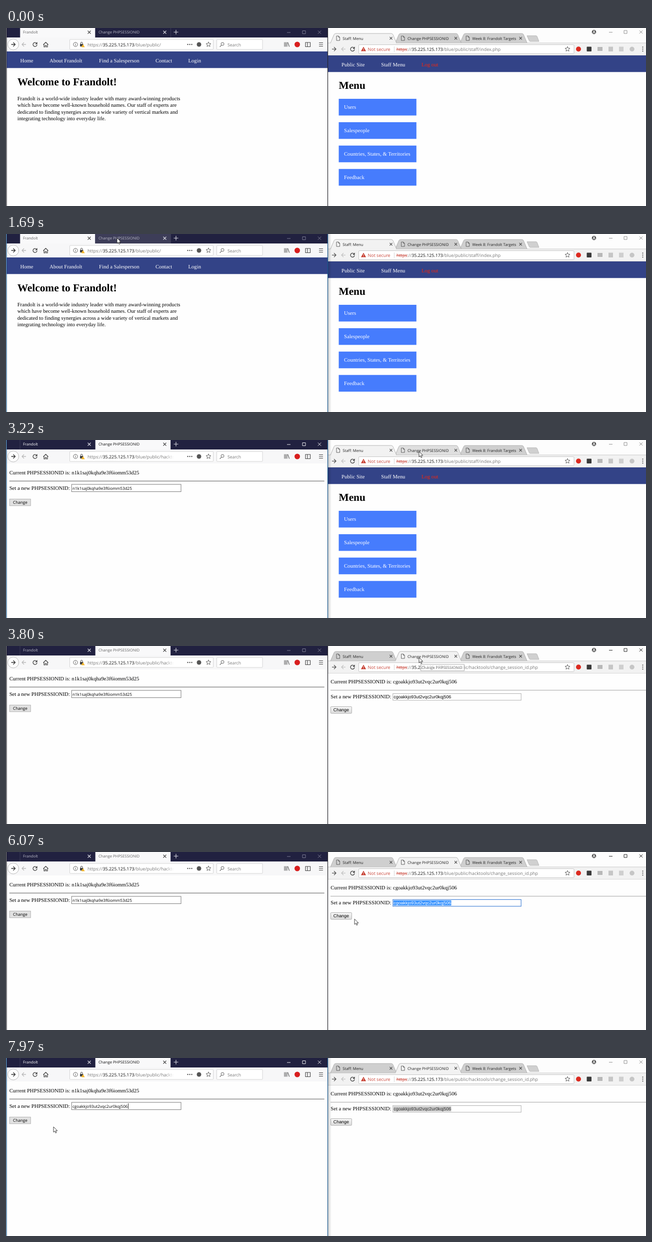
An HTML page for the animation above (8 s loop, 1280 by 357 pixels).

```html
<!DOCTYPE html>
<html lang="en">
<head>
<meta charset="utf-8">
<title>Two browsers</title>
<style>
html, body { margin: 0; width: 100%; height: 100%; overflow: hidden; background: #fefefe; }
svg { display: block; width: 100%; height: 100%; }
text { text-rendering: geometricPrecision; white-space: pre; }
.ui { font-family: "Open Sans", "Noto Sans", sans-serif; }
.page { font-family: "Liberation Serif", serif; font-size: 10.67px; }
.head { font-family: "Liberation Serif", serif; font-size: 21.33px; font-weight: bold; }
.arial { font-family: "Liberation Sans", sans-serif; font-size: 8.89px; }
</style>
</head>
<body>
<svg id="stage" viewBox="0 0 1280 357" xmlns="http://www.w3.org/2000/svg"></svg>
<script>
const LOOP = 8000;
const BRAND = 'Frandolt';
const TITLE = 'Change PHPSESSIONID';
const LEFT_ID = 'n1k1saj0kqha9e3f6iomm53d25';
const RIGHT_ID = 'cgoakkjo93ut2vqc2ur0kqj506';
const HOST = '35.225.125.173';
const NAVY = '#334387';

// Markup helpers
const rect = (x, y, w, h, fill, more = '') =>
  `<rect x="${x}" y="${y}" width="${w}" height="${h}" fill="${fill}" ${more}/>`;
const circle = (x, y, r, fill, more = '') =>
  `<circle cx="${x}" cy="${y}" r="${r}" fill="${fill}" ${more}/>`;
const line = (d, color, w = 1, more = '') =>
  `<path d="${d}" fill="none" stroke="${color}" stroke-width="${w}" ${more}/>`;
const text = (x, y, str, cls, fill = '#000', more = '') =>
  `<text x="${x}" y="${y}" class="${cls}" fill="${fill}" ${more}>${str}</text>`;
const ui = (x, y, size, str, fill, more = '') =>
  text(x, y, str, 'ui', fill, `font-size="${size}" ${more}`);
const group = (id, body, more = '') => `<g id="${id}" ${more}>${body}</g>`;
const cross = (x, y, r, color, w = 1, more = '') =>
  line(`M${x - r} ${y - r}l${2 * r} ${2 * r}m0 ${-2 * r}l${-2 * r} ${2 * r}`, color, w, more);
const arrow = (x, y, dir, color) =>
  line(`M${x - 4 * dir} ${y}h${8 * dir}M${x} ${y - 4}l${-4 * dir} 4l${4 * dir} 4`, color, 1.3);
const reload = (x, y) =>
  line(`M${x + 3} ${y - 2.6}a4 4 0 1 0 1 3.2`, '#444', 1.3) +
  `<path d="M${x + 4.6} ${y - 5}v4.4h-4.4z" fill="#444"/>`;
const star = (x, y) => {
  let d = '';
  for (let i = 0; i < 10; i++) {
    const a = Math.PI * (i / 5 - 0.5), r = i % 2 ? 2.3 : 5.2;
    d += (i ? 'L' : 'M') + (x + r * Math.cos(a)).toFixed(2) + ' ' + (y + r * Math.sin(a)).toFixed(2);
  }
  return line(d + 'z', '#555', 0.9);
};
const controls = (id, xs, y) => group(id,
  line(`M${xs[0] - 3} ${y + 0.5}h7M${xs[1] - 3} ${y - 3}h6v6h-6z`, 'currentColor', 0.9) +
  cross(xs[2], y, 3.2, 'currentColor', 0.9));
const navBar = (x, y, w, items) => rect(x, y, w, 33.3, NAVY) +
  items.map(([tx, str, color = '#fff']) => text(tx, y + 21.8, str, 'page', color)).join('');

function leftChrome() {
  return rect(1, 0, 642, 19, '#212140') +
    rect(28, 0, 150.5, 19, '#f9f9fa', 'id="lTab"') +
    rect(178.5, 0, 150.5, 19, '#3d3d58', 'id="lHover"') +
    line('M28 0v19M178.5 0v19M329.5 0v19', '#4a4a66', 0.6) +
    ui(34, 11.3, 7.65, BRAND, '', 'id="lName0"') +
    ui(185, 11.3, 7.65, TITLE, '', 'id="lName1"') +
    cross(166.5, 8.5, 3, 'currentColor', 1.1, 'id="lClose0"') +
    cross(317.5, 8.5, 3, 'currentColor', 1.1, 'id="lClose1"') +
    line('M335.5 8.3h9m-4.5 -4.5v9', '#dcdce4', 1.1) +
    controls('lControls', [565, 596, 627], 8.5) +
    rect(1, 19, 642, 28, '#f7f7f8') +
    circle(14.5, 33, 11, '#fdfdfd', 'stroke="#aaa" stroke-width=".8"') +
    arrow(14.5, 33, -1, '#333') + arrow(36, 33, 1, '#bbb') + reload(58, 33) +
    line('M74.5 33.5l5-4.8l5 4.8M76 33v5h2.4v-3h2.2v3H83v-5', '#444', 1.2) +
    rect(127.5, 23, 287, 20, '#fff', 'id="urlBox" rx="1" stroke-width=".8"') +
    circle(139, 33, 4.2, 'none', 'stroke="#555" stroke-width=".9"') +
    line('M139 32.3v3M139 30.3v1', '#555', 1) +
    rect(148, 32, 6.5, 5, '#444') + line('M149.4 32v-1.8a1.8 1.8 0 0 1 3.6 0v1.8', '#444', 1) +
    '<path d="M154 32.5l3.6 6h-7.2z" fill="#f3b52a"/>' +
    `<text x="163" y="36.6" class="ui" font-size="8.93" fill="#777" clip-path="url(#urlClip)">https://<tspan fill="#111">${HOST}</tspan>/blue/public/<tspan id="lPath">hacktools/</tspan></text>` +
    rect(318, 24, 18, 18, 'url(#fade)') +
    circle(363.5, 33, 1.2, '#555') + circle(367.5, 33, 1.2, '#555') + circle(371.5, 33, 1.2, '#555') +
    circle(386, 33, 4.5, '#555') + star(405, 33) +
    rect(421.5, 23, 91.5, 20, '#fff', 'rx="1" stroke="#ccc" stroke-width=".8"') +
    circle(433, 32, 3, 'none', 'stroke="#666"') + line('M431 34.4l-3.4 3.4', '#666', 1.2) +
    ui(443, 36.6, 8.55, 'Search', '#777') +
    line('M557 28.5v9M559.5 28.5v9M562 28.5v9M563.6 28.7l3 8.8', '#555', 1.1) +
    circle(582.5, 33, 5.5, '#d81e1e') +
    line('M599 29h9.5v8.5H599zM603 29v8.5', '#444', 1.1) +
    line('M626 29.5h8M626 33h8M626 36.5h8', '#444', 1.2);
}

function leftHome() {
  const story = [
    BRAND + ' is a world-wide industry leader with many award-winning products',
    'which have become well-known household names. Our staff of experts are',
    'dedicated to finding synergies across a wide variety of vertical markets and',
    'integrating technology into everyday life.'
  ];
  return navBar(1, 47, 642, [[28.5, 'Home'], [87, 'About ' + BRAND], [186, 'Find a Salesperson'],
      [299, 'Contact'], [364.5, 'Login']]) +
    text(22.7, 115, `Welcome to ${BRAND}!`, 'head') +
    story.map((s, i) => text(22.7, 145 + i * 13.4, s, 'page')).join('');
}

function leftForm() {
  return text(6.7, 68.5, 'Current PHPSESSIONID is: ' + LEFT_ID, 'page') +
    line('M6.7 82.3h630', '#555', 1) +
    text(6.7, 100, 'Set a new PHPSESSIONID:', 'page') +
    rect(131.2, 89, 218.8, 14.6, '#fff', 'id="lField" stroke-width="1"') +
    rect(133, 91, 119.5, 11, '#0078d7', 'id="lSelect"') +
    ui(133, 99.6, 8.12, LEFT_ID, '#000', 'id="lValue"') +
    rect(244.2, 91, 0.8, 11, '#000', 'id="lCaret"') +
    rect(7.2, 118.4, 42, 13.4, '#e1e1e1', 'stroke="#adadad" stroke-width=".9"') +
    ui(14, 128.2, 8.2, 'Change', '#000');
}

function rightTab(i, name) {
  const x = 649 + i * 129.6, w = i === 2 ? 134 : 132;
  return group('rTab' + i,
    `<path id="rShape${i}" d="M${x} 30l7-16.5q1-2.5 3.5-2.5h${w - 21}q2.5 0 3.5 2.5l7 16.5" stroke="#a5a5a5" stroke-width=".8"/>` +
    line(`M${x + 12} 16h4l2.5 2.5v6.5h-6.500zM${x + 16} 16v2.5h2.500`, '#555', 0.9) +
    ui(x + 24.3, 23.8, 7.7, name, '#222') +
    cross(x + 121, 20.5, 2.6, '#444', 1.1));
}

function rightChrome() {
  return rect(644, 0, 636, 30, '#fdfdfd') +
    '<path d="M1042 15.500h18q1.500 0 2.200 1.500l3.800 10h-17q-2 0-2.600-1.500z" fill="#d0d0d0" stroke="#aaa" stroke-width=".7"/>' +
    rightTab(2, `Week 8: ${BRAND} Targets`) + rightTab(1, TITLE) + rightTab(0, 'Staff: Menu') +
    circle(1176, 8, 4.3, '#555') + circle(1176, 6.7, 1.4, '#fff') +
    line('M1173.500 10.300q2.500-2.400 5 0', '#fff', 1.2) +
    controls('rControls', [1209, 1239, 1270], 8) +
    rect(644, 30, 636, 25, '#f2f2f2') + line('M644 54.6h636', '#ccc', 0.7) +
    line('M644 30h5.500M1040 30h240', '#b5b5b5', 0.7) +
    line('', '#b5b5b5', 0.7, 'id="rEdge"') +
    arrow(656, 42.3, -1, '#555') + arrow(675, 42.3, 1, '#c4c4c4') + reload(693, 42.3) +
    rect(705.5, 33.5, 430.5, 18, '#fff', 'rx="1.5" stroke="#bbb" stroke-width=".8"') +
    '<path d="M715 37.500l5 9h-10z" fill="#c53a2c"/>' + line('M715 40.500v3M715 44.400v1', '#fff', 1) +
    ui(723.5, 45.8, 8.95, 'Not secure', '#c9463a') +
    line('M776.500 37v11', '#ccc', 0.8) +
    `<text x="781" y="45.8" class="ui" font-size="8.85" fill="#777"><tspan fill="#c9463a">https</tspan>://<tspan fill="#111">${HOST}</tspan>/blue/public/<tspan id="rPath"></tspan></text>` +
    line('M780.500 43h22', '#c9463a', 0.9) + star(1123, 42.3) +
    circle(1145, 42.3, 5, '#dc2a20') + rect(1161.5, 37.5, 9.5, 9.5, '#3a3a3a', 'rx="1"') +
    rect(1183, 38, 10, 8, '#b8b8b8') + rect(1205, 37.5, 9, 9.5, '#c6c6c6') +
    rect(1226, 37.5, 9, 9.5, '#cfcfcf') + circle(1252, 42.3, 4.8, '#c6c6c6') +
    [38.3, 42.3, 46.3].map(y => circle(1273.5, y, 1.1, '#555')).join('');
}

function rightMenu() {
  const items = ['Users', 'Salespeople', 'Countries, States, &amp; Territories', 'Feedback'];
  return navBar(644, 55, 636, [[671, 'Public Site'], [750.3, 'Staff Menu'], [831, 'Log out', '#f5260c']]) +
    text(665.5, 122.3, 'Menu', 'head') +
    items.map((s, i) => rect(665.5, 142 + i * 46.9, 155.3, 33.5, '#467cfd') +
      text(676, 162.3 + i * 46.9, s, 'page', '#fff')).join('');
}

function rightForm() {
  return text(649.3, 75.3, 'Current PHPSESSIONID is: ' + RIGHT_ID, 'page') +
    line('M649 88.700h631', '#999', 0.9) +
    text(649.3, 105.2, 'Set a new PHPSESSIONID:', 'page') +
    rect(773.8, 95.4, 256.4, 13.4, '#fff', 'id="rField"') +
    rect(775, 97, 115.5, 10.2, '', 'id="rSelect"') +
    text(775.3, 105, RIGHT_ID, 'arial', '#000', 'id="rValue"') +
    rect(807, 97, 0.8, 10, '#000', 'id="rCaret"') +
    rect(649.4, 121.6, 42, 13.5, 'url(#btn)', 'rx="1.3" stroke="#a9a9a9" stroke-width=".9"') +
    text(654.8, 131.4, 'Change', 'arial');
}

const stage = document.getElementById('stage');
stage.innerHTML = `<defs>
  <clipPath id="urlClip"><rect x="160" y="24" width="175.5" height="18"/></clipPath>
  <linearGradient id="fade"><stop stop-color="#fff" stop-opacity="0"/><stop offset="1" stop-color="#fff"/></linearGradient>
  <linearGradient id="btn" x2="0" y2="1"><stop stop-color="#f8f8f8"/><stop offset="1" stop-color="#dcdcdc"/></linearGradient>
  <linearGradient id="shade"><stop stop-opacity=".18"/><stop offset="1" stop-opacity="0"/></linearGradient>
  </defs>` +
  rect(0, 0, 1280, 357, '#fefefe') +
  leftChrome() + group('lHome', leftHome()) + group('lForm', leftForm()) +
  rightChrome() + group('rMenu', rightMenu()) + group('rForm', rightForm()) +
  rect(644, 0, 7, 357, 'url(#shade)', 'id="lShade"') +
  line('M1 0v357M643.500 0v357', '', 1.2, 'id="lBorder"') +
  group('tip', rect(829.5, 37, 87, 12.7, '#fff', 'stroke="#777" stroke-width=".8"') +
    ui(831, 46, 7.6, TITLE, '#575757')) +
  group('cursor',
    '<path id="pointer" d="M0 0v10.800l2.500-2.300l1.700 3.900l1.800-.8l-1.700-3.700h3.500z" fill="#fff" stroke="#111" stroke-width=".8"/>' +
    line('M-2.500-5.500h2l.5.500l.5-.5h2M0-5V5M-2.500 5.500h2l.5-.5l.5.500h2', '#111', 0.9, 'id="beam"'));

const el = {};
stage.querySelectorAll('[id]').forEach(n => el[n.id] = n);
const show = (id, on) => { el[id].style.display = on ? '' : 'none'; };
const set = (id, name, value) => el[id].setAttribute(name, value);

// Pointer moves: start, end, from x, y, to x, y, bend x, y
const moves = [
  [235, 490, 1101, 330, 630, 241, 0, 0],
  [670, 1360, 630, 241, 222, 8, 0, 0],
  [2000, 2380, 222, 8, 220, 96, 0, 0],
  [2510, 3220, 220, 96, 826, 23, 0, 0],
  [3930, 4310, 826, 23, 717, 109, 0, 0],
  [4340, 4510, 717, 109, 793, 101, 0, 0],
  [4900, 5100, 793, 101, 807, 106, 0, 0],
  [5640, 6450, 807, 106, 592, 147, 8, 6],
  [6460, 6920, 592, 147, 218, 96, 0, 0],
  [7570, 7970, 218, 96, 95, 138, 0, 0]
];
const clamp = v => Math.max(0, Math.min(1, v));

function pointerAt(t) {
  const [a, b, x0, y0, x1, y1, bx, by] = moves.filter(m => t >= m[0]).pop() || moves[0];
  const p = clamp((t - a) / (b - a)), e = p * p * (3 - 2 * p), arc = 4 * e * (1 - e);
  return [x0 + (x1 - x0) * e + bx * arc, y0 + (y1 - y0) * e + by * arc];
}

function paint(t) {
  const [x, y] = pointerAt(t);
  const over = (x0, y0, x1, y1) => t >= 260 && x >= x0 && x <= x1 && y >= y0 && y <= y1;
  const between = (a, b) => t >= a && t < b;

  const lForm = t >= 1740, rForm = t >= 3580, rSecond = t >= 3530;
  const lActive = between(1740, 3530) || t >= 7100;
  const rActive = between(3530, 7100);
  const pasted = t >= 7560, lSelected = between(7330, 7560), rSelected = t >= 5250;

  // Left window
  set('lBorder', 'stroke', between(1690, 3530) || t >= 7100 ? '#17568c' : '#26262c');
  show('lShade', between(1690, 3530) || t >= 7100);
  set('lTab', 'x', lForm ? 178.5 : 28);
  show('lHover', !lForm && over(178, 0, 329, 19));
  [0, 1].forEach(i => {
    const chosen = lForm === (i === 1);
    const color = chosen ? (lActive ? '#111' : '#666') : (lActive ? '#fff' : '#b9b9c6');
    set('lName' + i, 'fill', color);
    set('lClose' + i, 'color', chosen ? '#444' : '#dcdce4');
  });
  set('lControls', 'color', lActive ? '#fff' : '#85859a');
  set('urlBox', 'stroke', over(127, 22, 415, 43) ? '#999' : '#ccc');
  show('lPath', lForm);
  show('lHome', !lForm);
  show('lForm', lForm);
  const inLeft = lForm && over(131, 89, 350, 104);
  set('lField', 'stroke', inLeft ? '#222' : '#7a7a7a');
  show('lSelect', lSelected);
  set('lValue', 'fill', lSelected ? '#fff' : '#000');
  el.lValue.textContent = pasted ? RIGHT_ID : LEFT_ID;
  show('lCaret', pasted);

  // Right window
  const tabFill = i => (rSecond ? 1 : 0) === i ? '#f2f2f2'
    : i === 1 && over(784, 11, 908, 30) ? '#dfdfdf' : '#cfcfcf';
  [0, 1, 2].forEach(i => set('rShape' + i, 'fill', tabFill(i)));
  const front = el[rSecond ? 'rTab1' : 'rTab0'];
  if (front.nextElementSibling !== el.rTab2.parentNode.querySelector('#rTab0, #rTab1') &&
      front.dataset.front !== '1') {
    const back = el[rSecond ? 'rTab0' : 'rTab1'];
    back.after(front);
    front.dataset.front = '1';
    back.dataset.front = '';
  }
  set('rEdge', 'd', rSecond ? 'M649 30h130M910 30h130' : 'M780 30h260');
  set('rControls', 'color', rActive ? '#111' : '#8a8a8a');
  el.rPath.textContent = rForm ? 'hacktools/change_session_id.php' : 'staff/index.php';
  show('rMenu', !rForm);
  show('rForm', rForm);
  const focus = between(4870, 7100);
  set('rField', 'stroke', focus ? '#4a86d8' : '#a6a6a6');
  set('rField', 'stroke-width', focus ? 1.2 : 0.9);
  show('rSelect', rSelected);
  set('rSelect', 'fill', rActive ? '#3390ff' : '#c8c8c8');
  set('rValue', 'fill', rSelected && rActive ? '#fff' : rSelected ? '#323232' : '#000');
  show('rCaret', between(4920, 5250));

  // Tooltip and pointer
  set('tip', 'opacity', 0.95 * clamp((t - 3710) / 115) * clamp((4120 - t) / 120));
  const beam = inLeft || (rForm && over(773, 95, 1031, 109));
  show('cursor', t >= 260);
  show('beam', beam);
  show('pointer', !beam);
  set('cursor', 'transform', `translate(${x.toFixed(2)} ${y.toFixed(2)})`);
}

const start = performance.now();
function tick() {
  paint((performance.now() - start) % LOOP);
  requestAnimationFrame(tick);
}
paint(0);
requestAnimationFrame(tick);
</script>
</body>
</html>
```
